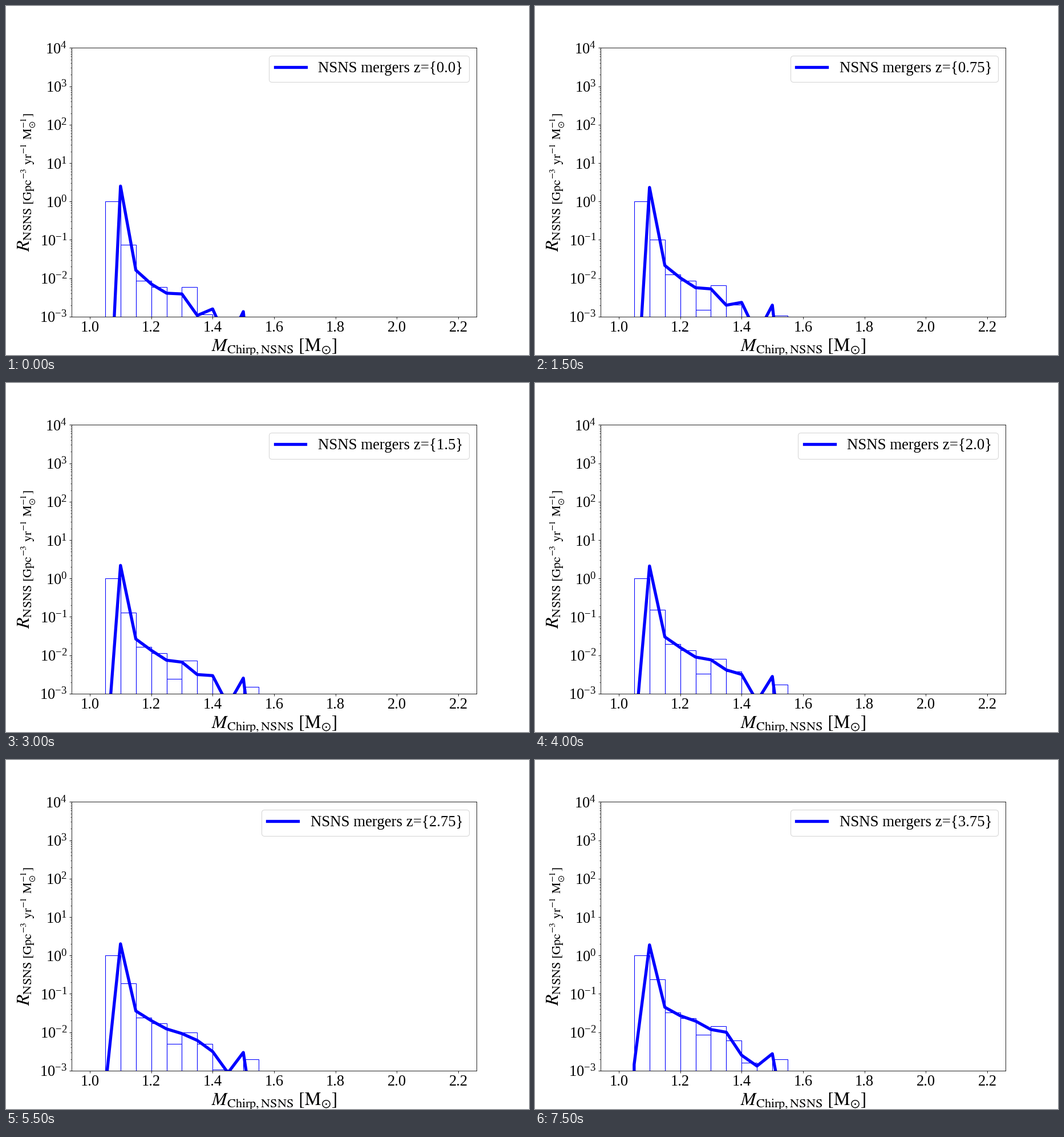
A matplotlib script for the animation above (8 s loop, 917 px wide and 611 px high).

```python
import numpy as np
import matplotlib.pyplot as plt
from matplotlib.animation import FuncAnimation
from matplotlib.ticker import LogLocator

W, H, DPI = 917, 611, 64
K = 76.4 / DPI  # point scale of a 12 x 8 inch layout
FRAMES, STEP = 16, 500
DZ = 0.25
BIN = 0.05
BLUE = "blue"

plt.rcParams.update({
    "font.family": "Liberation Serif",
    "mathtext.fontset": "stix",
    "font.size": 25 * K,
    "axes.labelsize": 30 * K,
    "axes.labelpad": 4 * K,
    "axes.linewidth": 0.8 * K,
    "legend.fontsize": 25.3 * K,
    "patch.linewidth": K,
})
for axis in ("xtick", "ytick"):
    for kind, size, width in (("major", 3.5, 0.8), ("minor", 2, 0.6)):
        plt.rcParams[f"{axis}.{kind}.size"] = size * K
        plt.rcParams[f"{axis}.{kind}.width"] = width * K
        plt.rcParams[f"{axis}.{kind}.pad"] = 3.5 * K

# log10 rate per mass bin from 1.05 on: first, last, optional bow between them
CURVE = [(-8, -2.84, 0.6), (0.4, 0.275), (-1.79, -1.35), (-2.15, -1.57),
         (-2.39, -1.71, -0.07), (-2.41, -1.93), (-2.97, -2), (-2.8, -2.6, 0.18),
         (-3.69, -2.88), (-2.87, -2.56, 0.13), (-6.8, -4.7)]
BARS = [(0, 0), (-1.13, -0.62), (-2.06, -1.49), (-2.23, -1.64), (-3.12, -2.07),
        (-2.23, -1.85, -0.1), (-2.94, -2.21, 0.08), (-3.6, -2.79),
        (-6, -6), (-3.2, -2.7, 0.14)]


def masses(bins):
    return 1.05 + BIN * np.arange(len(bins))


def ease(u, first, last, bow=0):
    """Rise quickly at first, plus a parabola that is zero at both ends."""
    return first + (last - first) * u ** 0.8 + bow * 4 * u * (1 - u)


def rates(bins, u):
    return [10 ** ease(u, *b) for b in bins]


fig = plt.figure(figsize=(W / DPI, H / DPI), dpi=DPI, facecolor="white")
ax = fig.add_subplot()
fig.subplots_adjust(left=0.125, right=0.9, bottom=0.11, top=0.88)
ax.set_yscale("log")

bars = ax.bar(masses(BARS), rates(BARS, 0), width=BIN, bottom=1e-9, align="edge",
              fill=False, edgecolor=BLUE, linewidth=K)
line, = ax.plot([], [], color=BLUE, linewidth=5 * K)

ax.set_xlim(0.94, 2.26)
ax.set_ylim(1e-3, 1e4)
ax.set_xticks(np.arange(1.0, 2.3, 0.2))
ax.yaxis.set_major_locator(LogLocator(numticks=12))
ax.yaxis.set_minor_locator(LogLocator(subs=np.arange(2, 10), numticks=12))
ax.set_xlabel(r"$M_{\mathrm{Chirp,NSNS}}\ \mathrm{[M_{\odot}]}$")
ax.set_ylabel(r"$R_{\mathrm{NSNS\ [Gpc^{-3}\ yr^{-1}\ M_{\odot}^{-1}]}}$")


def draw(i):
    u = i / (FRAMES - 1)
    # the empty first bin makes the line drop straight down
    line.set_data([1.0, *masses(CURVE)], [1e-200, *rates(CURVE, u)])
    for bar, rate in zip(bars, rates(BARS, u)):
        bar.set_height(rate)
    ax.legend([line], [f"NSNS mergers z={{{i * DZ}}}"], loc="upper right")
    return [line, *bars]


anim = FuncAnimation(fig, draw, frames=FRAMES, interval=STEP, repeat=True)
plt.show()
```
